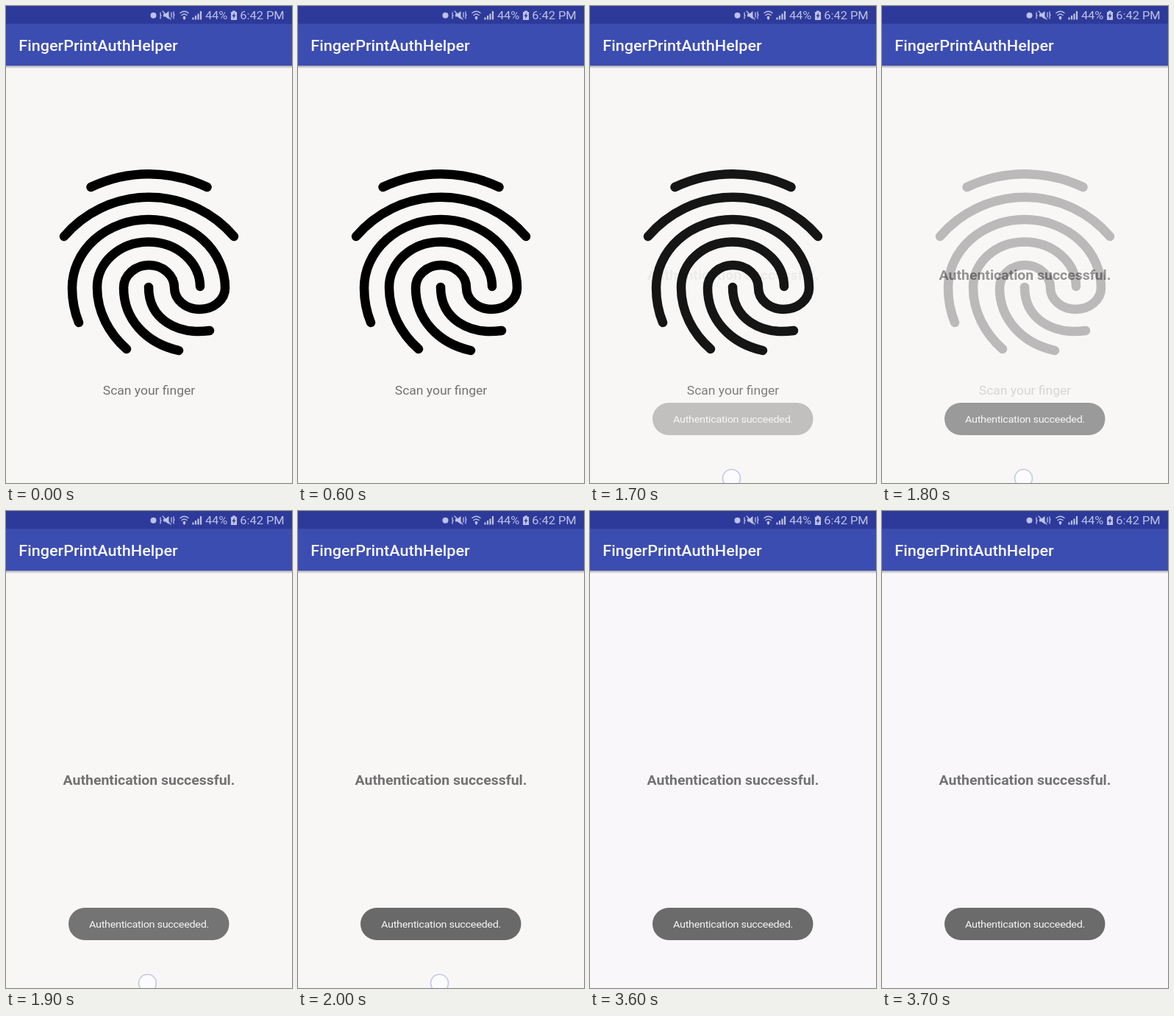
These frames come from a looping animation (389 by 648 pixels, 3.8 s). An HTML page:

```html
<!DOCTYPE html>
<html lang="en">
<head>
<meta charset="utf-8">
<title>Fingerprint sign-in</title>
<style>
  html, body { margin: 0; width: 100%; height: 100%; overflow: hidden; }
  svg { display: block; width: 100vw; height: 100vh; }
  text { font-family: Roboto, "Noto Sans", sans-serif; }
  .mid { text-anchor: middle; }
  .line { fill: none; stroke-linecap: round; }
</style>
</head>
<body>
<svg viewBox="0 0 389 648" preserveAspectRatio="none">
  <defs>
    <linearGradient id="shade" x2="0" y2="1">
      <stop stop-color="#223" stop-opacity=".38"/>
      <stop offset="1" stop-color="#223" stop-opacity="0"/>
    </linearGradient>
  </defs>
  <rect id="page" width="389" height="648"/>
  <rect y="81" width="389" height="4" fill="url(#shade)"/>
  <rect width="389" height="81" fill="#3c4db1"/>
  <rect width="389" height="24.3" fill="#2e3a9a"/>

  <!-- status icons -->
  <g fill="#bdc2e6" stroke="#bdc2e6" stroke-width="0">
    <circle cx="200.5" cy="12.8" r="4"/>
    <path d="M214 10.5h3l4.500-3.500v11l-4.500-3.500h-3z"/>
    <path class="line" stroke-width="1.300" d="M213 7l11 11M210 9v3l1 1-1 1v3M228 8v3l1 1-1 1v4M225 9v6"/>
    <path class="line" stroke-width="1.500" d="M237 9.500q5.500-4.500 11 0M239 12.500q3.500-3 7 0"/>
    <path d="M240.500 15l2-1.500 2 1.500-1 3.500h-2z"/>
    <path class="line" stroke-width="2.200" style="stroke-linecap:butt"
          d="M254.500 18.500v-3M258 18.500v-5.500M261.500 18.500v-8M265 18.500v-11.500"/>
    <path d="M308 6.500h4v1.500h2v11h-8v-11h2z"/>
    <path fill="#2e3a9a" d="M311 9l-3.500 5h2l-.5 3.500 3.500-5h-2z"/>
  </g>

  <g id="finger">
    <path class="line" stroke="#000" stroke-width="12.500" d="
      M115.500 246A184 184 0 0 1 273.500 246
      M79 313A152 152 0 0 1 310 313
      M99 430Q90 408 90 383A104 93 0 0 1 298 383A34.500 29 0 0 1 229 383
      A34.500 31 0 0 0 160 383C160 425 190 458 235 468
      M264 381A70 61.500 0 0 0 124 383C124 415 140 445 164 466
      M194 382C194 425 232 447 277 441"/>
  </g>

  <!-- text is laid out on a 360 x 640 screen -->
  <g transform="scale(1.08056 1.0125)">
    <g fill="#bdc2e6" font-size="15.2">
      <text x="250.700" y="18.200">44%</text>
      <text x="294.500" y="18.200">6:42 PM</text>
    </g>
    <text x="16" y="60.200" font-size="20" font-weight="500" fill="#f7f7fc">FingerPrintAuthHelper</text>
    <text id="hint" class="mid" x="180" y="521.300" font-size="16.200" fill-opacity=".54">Scan your finger</text>
    <text id="done" class="mid" x="180" y="367" font-size="18" font-weight="700" fill-opacity=".54">Authentication successful.</text>
  </g>

  <g id="toast">
    <rect id="pill" x="85" y="539" width="218.500" height="44" rx="22"/>
    <text class="mid" transform="scale(1.08056 1.0125)" x="180" y="559" font-size="13.400"
          letter-spacing="-.3" fill="#f6f5f5">Authentication succeeded.</text>
  </g>
  <circle id="ring" cx="192.500" cy="641.500" r="12" fill="#fcfcfe" stroke="#c3c8e6" stroke-width="1.600"/>
</svg>
<script>
const LOOP = 3800, STEP = 100;
const el = id => document.getElementById(id);
const ramp = (t, from, to) => Math.min(1, Math.max(0, (t - from) / (to - from)));
const ease = x => (1 - Math.cos(Math.PI * x)) / 2;
const mix = (a, b, k) => `rgb(${a.map((v, i) => Math.round(v + (b[i] - v) * k))})`;
const fade = (id, alpha) => el(id).setAttribute("opacity", alpha);
const paint = (id, colour) => el(id).setAttribute("fill", colour);

function draw(now) {
  const t = Math.floor(now % LOOP / STEP) * STEP;
  const swap = ease(ramp(t, 1660, 1870));
  const tint = ramp(t, 2000, 2600);
  fade("finger", 1 - swap);
  fade("hint", 1 - swap);
  fade("done", swap);
  fade("toast", ramp(t, 1556, 1930));
  fade("ring", t < 1600 ? 0 : 1 - ramp(t, 2000, 2500));
  paint("page", mix([249, 247, 246], [249, 247, 250], tint));
  paint("pill", t < 3600 ? mix([106, 105, 106], [101, 98, 102], tint) : "#6b6b6b");
}

const start = performance.now();
function tick() {
  draw(performance.now() - start);
  requestAnimationFrame(tick);
}
tick();
</script>
</body>
</html>
```
